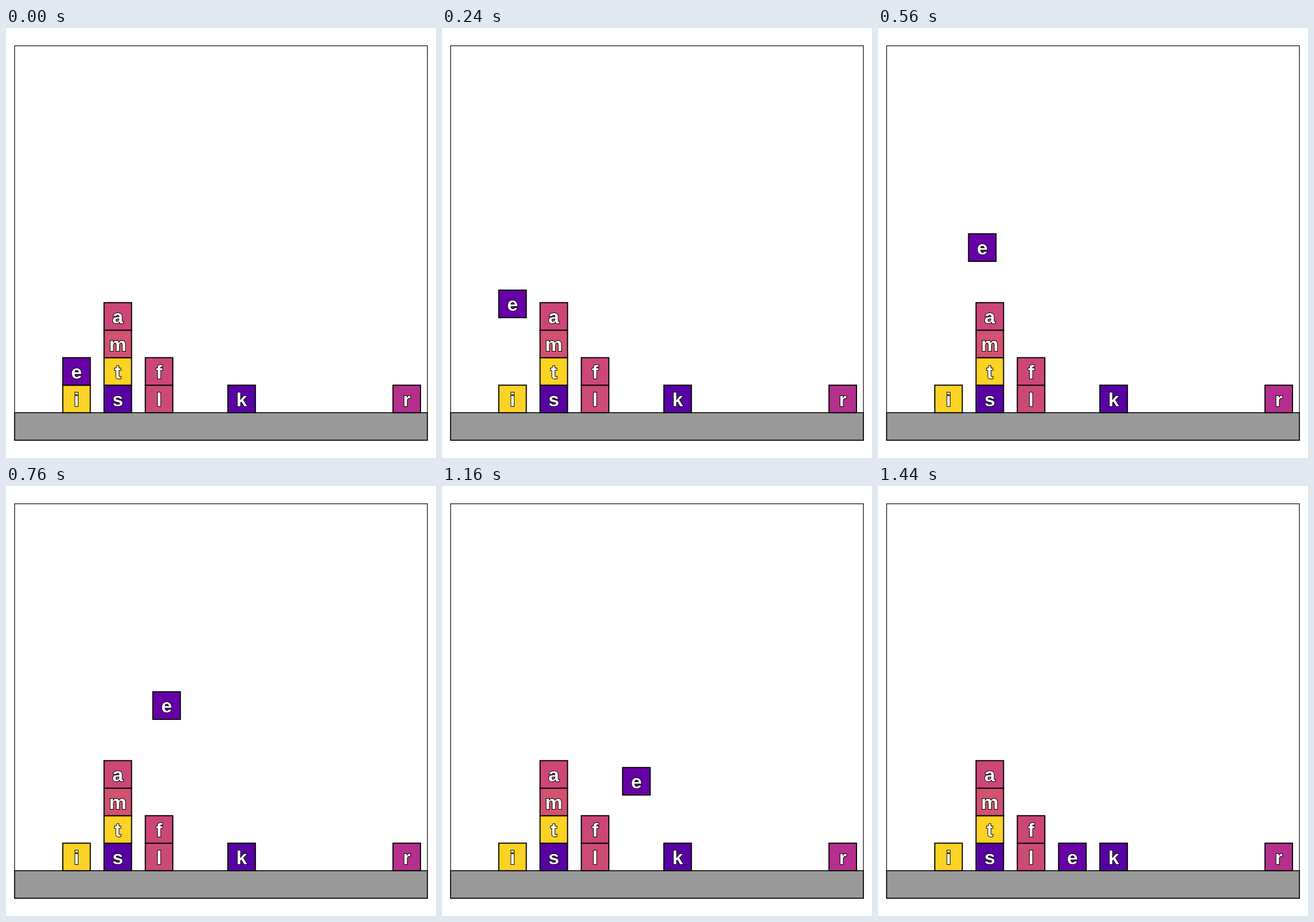
Write an HTML page with a canvas that moves like this. It is 748 px wide and 748 px high and loops after 1480 ms.

```html
<!DOCTYPE html>
<html lang="en">
<head>
<meta charset="utf-8">
<title>Moving a block</title>
<style>
  html, body { margin: 0; width: 100%; height: 100%; overflow: hidden; background: #fff; }
  canvas { display: block; width: 748px; height: 748px; }
</style>
</head>
<body>
<canvas id="stage" width="748" height="748"></canvas>
<script>
const ctx = document.getElementById("stage").getContext("2d");

const STEP_MS = 40;
const STEPS = 37;
const LEFT = 14.96;
const WIDTH = 748 - 2 * LEFT;
const BLOCK = WIDTH / 15;
const COLUMN = WIDTH / 10;
const HEIGHT = BLOCK * 43 / 3;
const TOP = (748 - HEIGHT) / 2;
const GROUND = TOP + HEIGHT - BLOCK;

// letter, column, row above the ground, colour
const blocks = [
  ["i", 1, 0, "#fcd225"],
  ["s", 2, 0, "#5801a4"],
  ["t", 2, 1, "#fcd225"],
  ["m", 2, 2, "#d35171"],
  ["a", 2, 3, "#cc4778"],
  ["l", 3, 0, "#cc4b74"],
  ["f", 3, 1, "#cc4778"],
  ["k", 5, 0, "#5801a4"],
  ["r", 9, 0, "#b52f8c"],
];

const clamp = v => Math.min(1, Math.max(0, v));

function box(x, y, w, h, fill, lineWidth) {
  ctx.fillStyle = fill;
  ctx.fillRect(x, y, w, h);
  ctx.strokeStyle = "#000";
  ctx.lineWidth = lineWidth;
  ctx.strokeRect(x, y, w, h);
}

function drawBlock(letter, column, row, color) {
  const x = LEFT + COLUMN * (column + 0.5);
  const bottom = GROUND - row * BLOCK;
  box(x - BLOCK / 2, bottom - BLOCK, BLOCK, BLOCK, color, 1.9);
  const baseline = bottom - 11.5;
  ctx.lineWidth = 2;
  ctx.strokeText(letter, x, baseline);
  ctx.fillStyle = "#fff";
  ctx.fillText(letter, x, baseline);
}

function draw(step) {
  ctx.fillStyle = "#fff";
  ctx.fillRect(0, 0, 748, 748);
  box(LEFT, TOP, WIDTH, HEIGHT, "#fff", 1.2);
  box(LEFT, GROUND, WIDTH, BLOCK, "#999", 1.6);

  ctx.font = 'bold 34px "Liberation Sans", Arial, sans-serif';
  ctx.textAlign = "center";
  ctx.lineJoin = "miter";
  ctx.miterLimit = 3;
  for (const block of blocks) drawBlock(...block);

  // lift, carry across, lower
  const lift = clamp(step / 11);
  const carry = clamp((step - 11) / 11);
  const lower = clamp((step - 22) / 14);
  drawBlock("e", 1 + 3 * carry, 1 + 4.5 * lift - 5.5 * lower, "#6700a7");
}

const start = performance.now();
function tick() {
  const elapsed = performance.now() - start;
  draw(Math.floor(elapsed / STEP_MS) % STEPS);
  requestAnimationFrame(tick);
}
tick();
</script>
</body>
</html>
```
